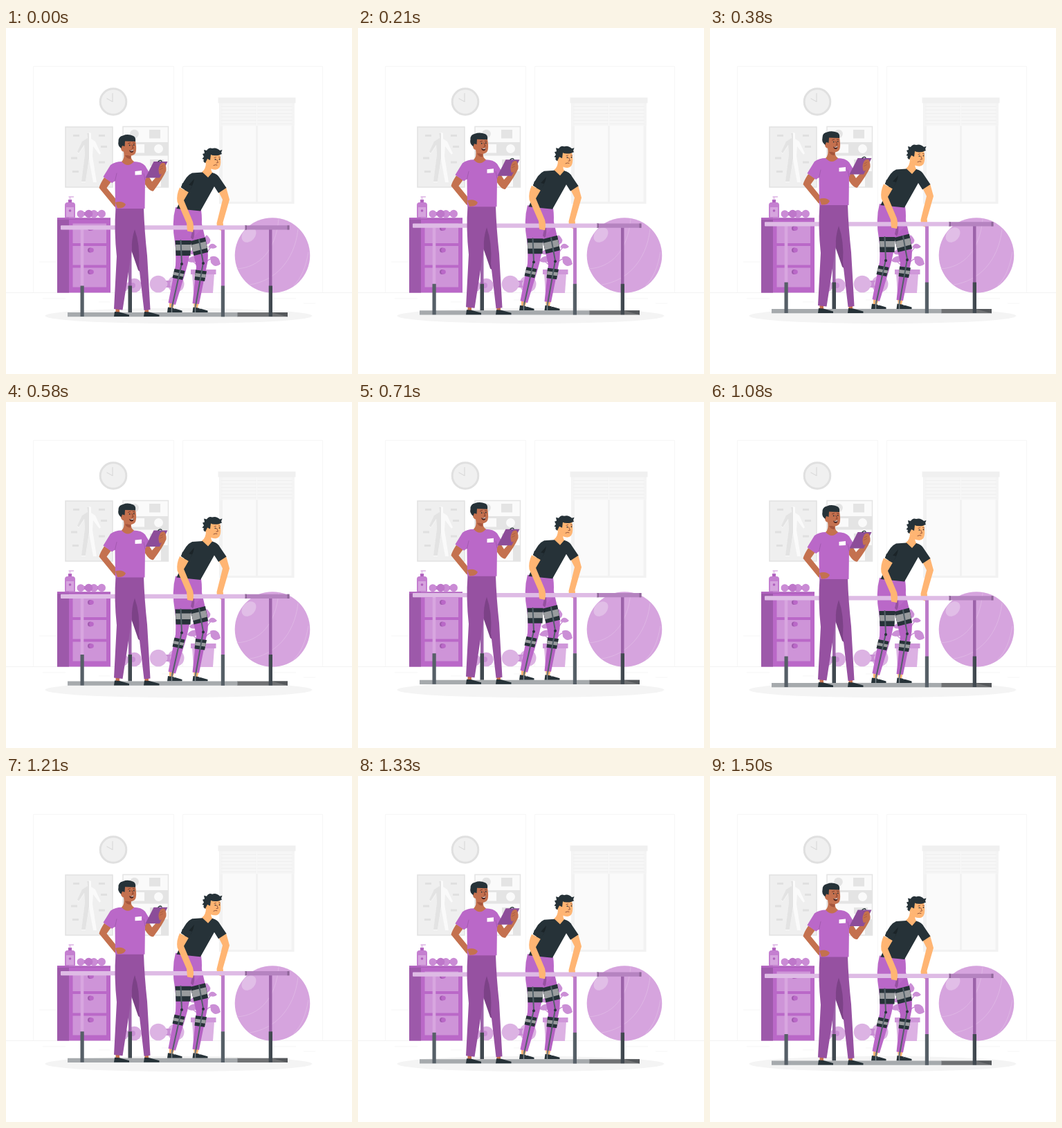
An HTML page for the animation above (1.54 s loop, 500 by 500 pixels).

```html
<!DOCTYPE html>
<html lang="en">
<head>
<meta charset="utf-8">
<title>Physiotherapy</title>
<style>
html, body { margin: 0; width: 100%; height: 100%; overflow: hidden; background: #fff; }
svg { display: block; width: 100vw; height: 100vh; }
.line { fill: none; stroke-linecap: round; stroke-linejoin: round; }
.purple { fill: #ba68c8; }
.ink { fill: #263238; }
.brown { fill: #c4714f; }
.peach { fill: #ffb573; }
</style>
</head>
<body>
<svg viewBox="0 0 500 500">
  <g id="room">
    <path d="M39.5 382V55.5H242.5V382M255.5 382V55.5H457.5V382" fill="none" stroke="#f6f6f6"/>
    <path d="M0 382.5H500" stroke="#ededed" stroke-width=".7"/>
    <path d="M48 338H72M53 391H86M134 396H150M387 391H419M430 398H447M225 393H241" stroke="#f3f3f3" stroke-width=".7"/>

    <circle cx="155" cy="106.5" r="18.8" fill="#f0f0f0" stroke="#e0e0e0" stroke-width="3"/>
    <path class="line" d="M154 94.500V106.500L146 102" stroke="#dadada" stroke-width="1.2"/>

    <rect x="86" y="143" width="68" height="87" fill="#efefef" stroke="#e2e2e2" stroke-width="1.5"/>
    <g id="chart">
      <path d="M117 152q3-2 6 0v8l6 4 8 17-2 2-9-12-1 14 6 38h-5l-6-33-5 33h-6l5-39-1-14-8 12-2-2 7-15 8-5z" fill="#fafafa"/>
      <path d="M117 152q2-1 3 0v37l-5 33h-6l5-39-1-14-8 12-2-2 7-15 8-5z" fill="#e3e3e3"/>
      <path d="M97 155.500h9M94 188h9M96 207.500h9M134 155.500h9M137 171.500h9M134 194h9" stroke="#e0e0e0" stroke-width="3"/>
    </g>

    <rect x="169" y="142.500" width="65.500" height="87.500" fill="#fafafa" stroke="#e4e4e4" stroke-width="1.5"/>
    <path d="M169 165h65v19.500h-65zM207 147h16v12.500h-16zM208 190h20v9h-20zM224 207h10v23h-10z" fill="#e4e4e4"/>
    <circle cx="185.500" cy="153" r="6.300" fill="#e4e4e4"/>
    <path d="M173 168h27v12.500h-27z" fill="#fafafa"/>
    <circle cx="220.500" cy="174.500" r="6.500" fill="#fafafa"/>

    <path d="M308 104h108.500v150H308z" fill="#f2f2f2"/>
    <path d="M313 108h48v143h-48zM364 108h48.500v143H364z" fill="#fafafa"/>
    <path d="M309 108h108v33.500H309z" fill="#f5f5f5" opacity=".8"/>
    <path d="M311 113.500h103M311 118.500h103M311 123.500h103M311 128.500h103M311 133.500h103M311 138.500h103" stroke="#eee" stroke-width=".8"/>
    <path d="M306.500 100.500h112v8h-112z" fill="#f0f0f0"/>
    <path d="M362.500 109v32" stroke="#fafafa"/>
  </g>

  <ellipse cx="249.500" cy="416" rx="193" ry="11.200" fill="#f4f4f4"/>

  <g id="props">
    <circle cx="385" cy="328.500" r="54.300" fill="#d6a4de"/>
    <path class="line" d="M334 348C366 346 390 322 394 276M352 371C388 366 417 337 422 291M416 372C428 360 433 345 437 324" stroke="#dfb8e5" stroke-width=".9"/>
    <ellipse cx="351" cy="299" rx="12" ry="9" transform="rotate(-48 351 299)" fill="#e1bee7"/>

    <g fill="#dcb3e3">
      <circle cx="220" cy="370" r="12.300"/><path d="M228 365h14v10h-14z"/>
      <circle cx="245.500" cy="370" r="12"/>
    </g>
    <path d="M231 365q5 5 0 10h8q-4-5 0-10z" fill="#c98fd4"/>
    <g fill="#d8aae0"><circle cx="168" cy="373" r="9"/><circle cx="185.500" cy="372" r="10.300"/></g>
    <circle cx="183" cy="372" r="4" fill="#c98fd4"/>

    <path class="line" d="M284 350Q284 320 286 304M284 350Q287 322 300 314M284 350Q272 338 265 334M284 350Q290 330 302 334" stroke="#c582d1" stroke-width="1.200"/>
    <path d="M285 316Q282 306 290 299Q298 306 294 311ZM292 317Q297 307 305 316Q301 321 292 317ZM295 331Q307 326 310 341Q302 348 296 339ZM277 337Q266 341 262 336Q268 328 275 330ZM279 326Q267 330 265 324Q271 318 279 320Z" fill="#cb8fd6"/>
    <path d="M269 355H301L299 383H271Z" fill="#dcb1e3"/>
    <path d="M267 349H303.500V356H267Z" fill="#cf97d9"/>

    <path class="purple" d="M74 274.500H151V382.500H74Z"/>
    <path d="M74 274.500H91V382.500H74Z" fill="#9d59aa"/>
    <path d="M74 274.500H151V277H74Z" fill="#b061be"/>
    <path d="M96.500 282.500H145V311H96.500ZM96.500 315H145V342.500H96.500ZM96.500 346.500H145V374.500H96.500Z" fill="#ce94d8"/>
    <g fill="#a05aae">
      <circle cx="121.500" cy="289.500" r="3.500"/><circle cx="121.500" cy="321" r="3.500"/><circle cx="121.500" cy="352.500" r="3.500"/>
    </g>
    <g class="purple">
      <circle cx="123.500" cy="289.500" r="3.300"/><circle cx="123.500" cy="321" r="3.300"/><circle cx="123.500" cy="352.500" r="3.300"/>
    </g>

    <path d="M85 256q0-4 4-4h7q4 0 4 4v18H85z" fill="#c47fd0"/>
    <path d="M90 248h5v4h-5z" fill="#b061be"/>
    <path d="M87 259h11v14H87z" fill="#d6a4de"/>
    <circle cx="92.500" cy="264" r="1.800" fill="#b061be"/>
    <path class="line" d="M92.500 248v-4M91 244h6.500" stroke="#dcb1e3" stroke-width="1.300"/>

    <path d="M108 266h30v5h-30z" fill="#b970c6"/>
    <g fill="#ca8bd5">
      <circle cx="108" cy="268.700" r="5.500"/><circle cx="127" cy="268.700" r="5.700"/><circle cx="138.300" cy="268.500" r="5.700"/>
    </g>
    <circle cx="119.500" cy="268.500" r="5.800" fill="#be77ca"/>
  </g>

  <g id="floating">
    <g id="rear-rail">
      <path d="M334 411H407V417.300H334Z" fill="#707274"/>
      <path d="M384 411H407V417.300Z" fill="#55585b"/>
      <path d="M177 291H181.500V373H177ZM380 291H384.500V373H380Z" fill="#9c63a9"/>
      <path d="M176.500 372.500H182V411H176.500ZM379.700 372.500H385V417H379.700Z" fill="#414950"/>
      <path d="M345 285.300H409.500V291.500H345Z" fill="#b583c0"/>
      <path d="M345 285.300H348V291.500H345ZM406.500 285.300H409.500V291.500H406.500Z" fill="#8f6799"/>
    </g>

    <g id="patient">
      <path class="peach" d="M306 234L318 230L323 248L313.500 281Q315 287 311.500 293L305 290L304.500 282L313 248Z"/>
      <path class="peach" d="M236 396H244L241 406H236ZM271 396H279L276.500 406H272Z"/>
      <path d="M260 270H280L288 305Q293 321 291.500 337L279 399L269.500 398L275 345L266 304Z" fill="#b562c3"/>
      <path class="purple" d="M245 259L282 263Q284 277 282 291L268 306Q266 331 259 354L245 400L234.500 397L245 343Q246 324 244 309Q239 282 245 259Z"/>
      <path d="M267 303L271 285Q274 300 270 306Z" fill="#9551a0"/>

      <g class="ink">
        <path d="M244.500 307H267.500L266.500 329H245.500Z"/>
        <path d="M266.500 308L288 302.500L292 324L271.500 329Z"/>
        <path d="M243.500 348L258.500 351L255 364L240.500 361Z"/>
        <path d="M274 349.500L290 351.500L287 366L272.500 364Z"/>
      </g>
      <path d="M245 313H267.300L266.800 321.500H245.300ZM268 313.500L288.800 308.500L290.800 318L270.300 323.500ZM242.500 352.500L257.300 355.500L256.300 359.500L241.700 356.800ZM273.500 354L289 356L288 361L273 359Z" fill="#999c9e"/>
      <path class="line" d="M252.500 307L254 340L239 407M279 306L285 339L273 407" stroke="#536068" stroke-width="2"/>
      <g class="ink"><circle cx="254" cy="341" r="2"/><circle cx="285" cy="340" r="2"/></g>
      <path class="ink" d="M234 403.500L241 404.500L254.500 408.500V411H233ZM270.500 403.500L277.500 404.500L291.500 408.500V411H269.500Z"/>
      <path class="line" d="M239.500 400V411M273.500 400V411" stroke="#7b8589" stroke-width="1.500"/>
      <path class="line" d="M243 405.500l3-1.500M280 405.500l3-1.500" stroke="#eee"/>

      <path class="peach" d="M289 194L297 202Q295 206 300 211L292 219L283 208Q289 204 289 194Z"/>
      <path class="ink" d="M284 208.500L292 216L298 209Q306 211 309 217L318.500 231L307 238.500L301 229L281 264.500L246.500 261L259 234L253 230Q260 213 269 209.500Z"/>
      <path d="M272 218Q270 231 261 239L252 258L255 237Z" fill="#1b2428"/>
      <path class="peach" d="M290 184Q299 177 309 182Q313 203 304 204.500Q295 206 291 196Q285 195 287 189Z"/>
      <path class="ink" d="M288 195Q284 193 286 190L283.500 189L286 186L284 182L287 181L286 176L290 177Q293 172 298 174Q304 172 309 177L312.500 176L311 180L312 182L307 184Q299 185 296 183L295 191L291 189Z"/>
      <path class="line" d="M301 187.500l2.500-.7M307.500 186.500l2 .5M304.500 190l2 4.500-2.500.5M300 198.500q3-1.500 5-.5" stroke="#7a3d2d" stroke-width=".8"/>
      <g class="ink"><circle cx="302.500" cy="190" r=".9"/><circle cx="308.500" cy="189.500" r=".9"/></g>
    </g>

    <g id="front-rail">
      <path d="M89 411H334.500V417.300H89Z" fill="#a6aaad"/>
      <path d="M107.700 291H112.300V373H107.700Z" fill="#d8a6e0"/>
      <path d="M311 291H316V373H311Z" fill="#bd7bc9"/>
      <path d="M107.500 372.500H112.700V417H107.500ZM310.800 372.500H316V417.300H310.800Z" fill="#565f67"/>
      <rect x="79" y="285.300" width="266.500" height="6.200" rx="1" fill="#debbe5"/>
    </g>

    <path id="near-arm" class="peach" d="M251 230.500L264 237L257 249L270 280Q272 288 270 295L262 293.500L261 282L247.500 251Q246 241 251 230.500Z"/>
    <path class="ink" d="M255 224L253 230.500L264 237.500L269 228Z"/>

    <g id="therapist">
      <path class="brown" d="M158.500 404H164V412H158.500ZM200.500 404H206V412H200.500Z"/>
      <path d="M180 285H195L202 360L191 350L180 318Z" fill="#7c4287"/>
      <path d="M158.500 260H199Q200 293 204 329L208.500 407L199.500 408L192 343Q194 313 186 291Q181 306 182 320L168.500 407.500L156 406L160 330Q156 293 158.500 260Z" fill="#9651a1"/>
      <path class="ink" d="M157 410L164 410.500L178 414.500V417H156ZM200 410L207 410.500L221.500 414.500V417H199Z"/>

      <path class="brown" d="M142 216L152 222L145.500 231L161 250Q171 250 173 255Q171 261 162 260.500Q157 259 155 256L134.500 231Q136 225 142 216Z"/>
      <path class="brown" d="M201 217L206 214L211 222L221 211Q218 202 222 194Q232 194 231.500 206Q227 217 213 235.500Q208 237 201 226Z"/>
      <path class="purple" d="M167 193Q175 196 184 193Q196 193 201 199L207 209L201 220L200.500 261H158L157.500 221L153 224L140.500 215L151 198Q158 193 167 193Z"/>
      <path class="line" d="M157.500 221L160 210M201 220L199 210" stroke="#9d56aa" stroke-width=".8"/>
      <path class="brown" d="M158 252Q168 249 173 255Q171 261 161 260.500Z"/>
      <path class="brown" d="M170 178L181 184Q180 190 185 193Q176 203 167 193Q172 189 170 178Z"/>
      <path d="M172 184L180 184L180 189Q174 189 172 184Z" fill="#a4553c"/>

      <path d="M213.500 193H233.500L222 216.500H201.500Z" fill="#8c4d99"/>
      <path class="line" d="M220 193q3-3 5-.5" stroke="#263238" stroke-width="1.300"/>
      <path class="brown" d="M222 199Q224 194 229 195Q233 201 230 208L222 212Q219 205 222 199Z"/>
      <path class="line" d="M223 201l4-2M222.500 204.500l4-2" stroke="#a4553c" stroke-width=".7"/>
      <path d="M186.500 207L196 206V212L186.500 212.500Z" fill="#fff"/>

      <path class="brown" d="M167 164Q177 157 187 163Q190 180 185 183Q177 188 171 179Q165 178 166 171Z"/>
      <path class="ink" d="M166.500 174Q161 170 162.500 164Q162 157 169 155.500Q176 152.500 184 156Q188 158 187 164L172 163.500L171.500 171L168 170Z"/>
      <path class="line" d="M176.500 167l3-1M183.500 166l2.500.5M182 169l2 4.500-2 .5" stroke="#6c2f20" stroke-width=".8"/>
      <g class="ink"><circle cx="178.700" cy="169.500" r=".9"/><circle cx="184.800" cy="169" r=".9"/></g>
      <path d="M178 176.500Q181 177.500 184.500 175.500Q184.500 180 181.500 180Q179 180 178 176.500Z" fill="#4a211c"/>
      <path d="M178.500 176.700Q181 177.600 184.300 175.800L184 177.300Q181 178.500 178.500 176.700Z" fill="#fff"/>
    </g>
  </g>
</svg>
<script>
const PERIOD = 1540, PHASE = 35, RISE = 10;
const floating = document.getElementById('floating');

// Constant-speed rise and fall, measured from the pose at time zero.
const height = t => RISE * (1 - Math.abs(2 * ((t + PHASE) % PERIOD) / PERIOD - 1));
const rest = height(0);

function draw(now) {
  floating.setAttribute('transform', `translate(0 ${rest - height(now)})`);
  requestAnimationFrame(draw);
}
const start = performance.now();
draw(0);
requestAnimationFrame(function tick() {
  draw = () => {};
  floating.setAttribute('transform', `translate(0 ${rest - height(performance.now() - start)})`);
  requestAnimationFrame(tick);
});
</script>
</body>
</html>
```
